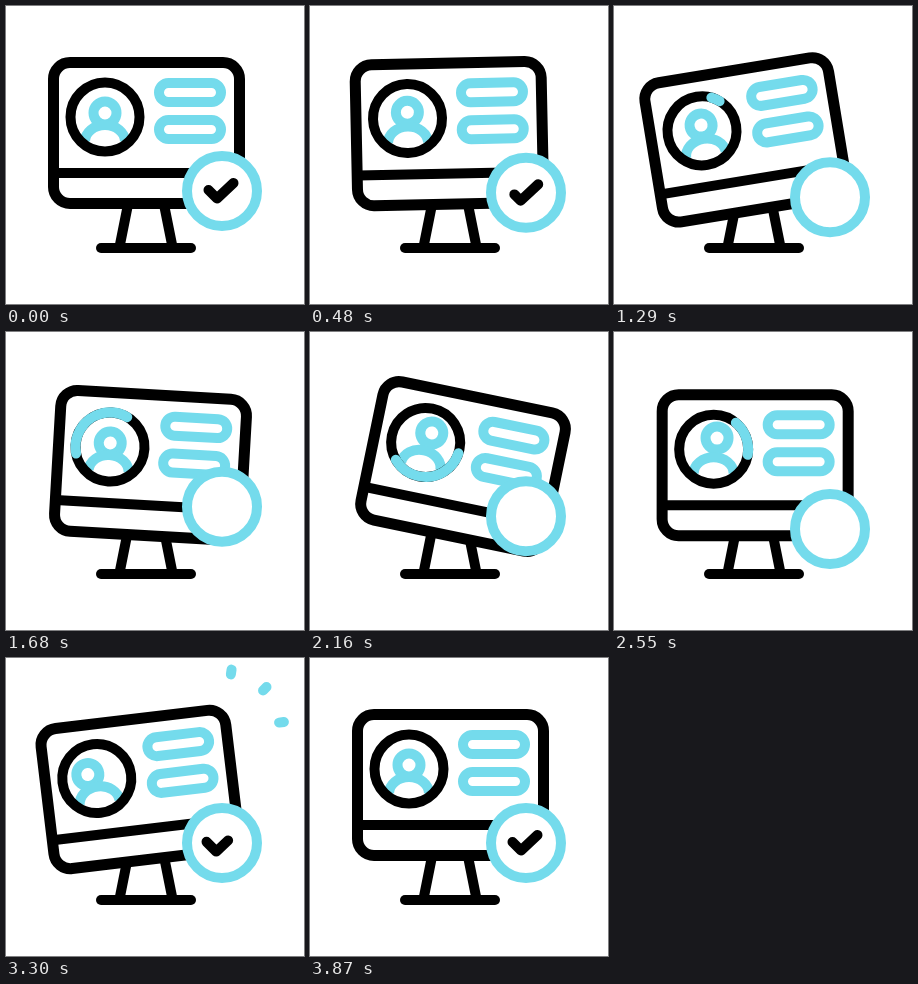
Recreate the animation shown at these times as an HTML page with a canvas. Size 298 by 298 pixels, loop 4500 ms.

```html
<!DOCTYPE html>
<html lang="en">
<head>
<meta charset="utf-8">
<title>Profile verified</title>
<style>
  html, body { margin: 0; width: 100%; height: 100%; overflow: hidden; background: #fff; }
  canvas { display: block; width: 298px; height: 298px; }
</style>
</head>
<body>
<canvas id="stage" width="298" height="298"></canvas>
<script>
const ctx = document.getElementById('stage').getContext('2d');
const LOOP = 4500, STEP = 30;
const BLACK = '#000', BLUE = '#74dbec', WHITE = '#fff';
const RAD = Math.PI / 180;

const clamp = p => Math.min(1, Math.max(0, p));
const smooth = p => p * p * (3 - 2 * p);
const linear = (t, from, to) => clamp((t - from) / (to - from));
const ease = (t, from, to) => smooth(linear(t, from, to));

// Keys are [time, value] pairs joined by eased segments.
function track(t, keys) {
  let value = keys[0][1];
  for (let i = 1; i < keys.length; i++) {
    value += (keys[i][1] - keys[i - 1][1]) * ease(t, keys[i - 1][0], keys[i][0]);
  }
  return value;
}

const TILT = [[300, 0], [1160, -10.6], [2070, 12.3], [2970, -10], [3850, 0]];
const DROP = [[300, 0], [1200, 6.2], [2950, 6.2], [3850, 0]];
const BOB = [[300, 0], [1050, 12], [1800, -12], [2550, 12], [3300, 0]];
const HEAD_X = [[300, 0], [820, 0], [1680, 0], [2340, 5], [3300, -8.4], [3870, 0]];
const HEAD_Y = [[300, 0], [820, -8], [1500, 0], [1680, 0], [2340, -8], [3300, -1], [3870, 0]];

function stroke(color, build, width = 10, fill) {
  ctx.beginPath();
  build();
  if (fill) {
    ctx.fillStyle = fill;
    ctx.fill();
  }
  ctx.strokeStyle = color;
  ctx.lineWidth = width;
  ctx.stroke();
}

function polyline(points) {
  points.forEach(([x, y], i) => i ? ctx.lineTo(x, y) : ctx.moveTo(x, y));
}

const circle = (x, y, r) => ctx.arc(x, y, r, 0, 2 * Math.PI);

// Part of a polyline between two fractions of its length.
function trimmed(points, from, to) {
  const lengths = points.slice(1).map(([x, y], i) => Math.hypot(x - points[i][0], y - points[i][1]));
  const total = lengths.reduce((a, b) => a + b);
  const part = [];
  let walked = 0;
  lengths.forEach((len, i) => {
    const a = clamp((from * total - walked) / len);
    const b = clamp((to * total - walked) / len);
    if (b > a) {
      const [x0, y0] = points[i], [x1, y1] = points[i + 1];
      const at = p => [x0 + (x1 - x0) * p, y0 + (y1 - y0) * p];
      if (!part.length) part.push(at(a));
      part.push(at(b));
    }
    walked += len;
  });
  return part;
}

function drawStand() {
  ctx.lineCap = 'butt';
  stroke(BLACK, () => {
    polyline([[121.5, 201], [113.5, 241]]);
    polyline([[158.5, 201], [166.5, 241]]);
  });
  ctx.lineCap = 'round';
  stroke(BLACK, () => polyline([[95, 242], [185, 242]]));
}

function drawAvatar(t) {
  const x = 99, y = 111, r = 34.5;
  stroke(BLUE, () => circle(x + track(t, HEAD_X), y - 4 + track(t, HEAD_Y), 11.5));
  ctx.lineCap = 'butt';
  stroke(BLUE, () => ctx.ellipse(x, y + 24.5, 20, 16.5, 0, Math.PI, 0));
  ctx.lineCap = 'round';
  stroke(BLACK, () => circle(x, y, r));

  const head = linear(t, 1245, 2330), tail = linear(t, 1640, 2730);
  if (head > tail) {
    const angle = p => (310 - 360 * p) * RAD;
    stroke(BLUE, () => ctx.arc(x, y, r, angle(tail), angle(head), true));
  }
}

function drawMonitor(t) {
  const drop = track(t, DROP);
  ctx.save();
  ctx.translate(140 + drop * 0.1, 186 + drop);
  ctx.rotate(track(t, TILT) * RAD);
  ctx.translate(-140, -186);
  stroke(BLACK, () => ctx.roundRect(47.5, 56.5, 186, 141, 16.5), 11, WHITE);
  stroke(BLACK, () => polyline([[48, 167], [233, 167]]));
  for (const y of [77, 114]) {
    stroke(BLUE, () => ctx.roundRect(153, y, 62, 19, 9.5));
  }
  drawAvatar(t);
  ctx.restore();
}

function drawBadge(t) {
  ctx.save();
  ctx.translate(216, 185 + track(t, BOB));
  stroke(BLUE, () => circle(0, 0, 35), 10, WHITE);

  const erased = ease(t, 300, 1200), drawn = ease(t, 2730, 3570);
  const returning = t >= 2730;
  const scale = 1 + 0.6 * (returning ? 1 - drawn : erased);
  const check = [[-13.5, -1], [-5, 7.5], [11.5, -8]].map(p => p.map(v => v * scale));
  const part = returning ? trimmed(check, 0, drawn) : trimmed(check, erased, 1);
  if (part.length) stroke(BLACK, () => polyline(part));
  ctx.restore();
}

function drawSparks(t) {
  const radius = p => 37 + 24.5 * p;
  const head = ease(t, 2760, 3120), tail = ease(t, 3000, 3420);
  if (head <= tail) return;
  for (const degrees of [-8, -45, -82]) {
    const at = r => [217 + r * Math.cos(degrees * RAD), 72.5 + r * Math.sin(degrees * RAD)];
    stroke(BLUE, () => polyline([at(radius(tail)), at(radius(head))]));
  }
}

function draw(t) {
  ctx.fillStyle = WHITE;
  ctx.fillRect(0, 0, 298, 298);
  ctx.lineCap = ctx.lineJoin = 'round';
  drawStand();
  drawSparks(t);
  drawMonitor(t);
  drawBadge(t);
}

const start = performance.now();
function tick() {
  const t = (performance.now() - start) % LOOP;
  draw(Math.floor(t / STEP) * STEP);
  requestAnimationFrame(tick);
}
tick();
</script>
</body>
</html>
```
